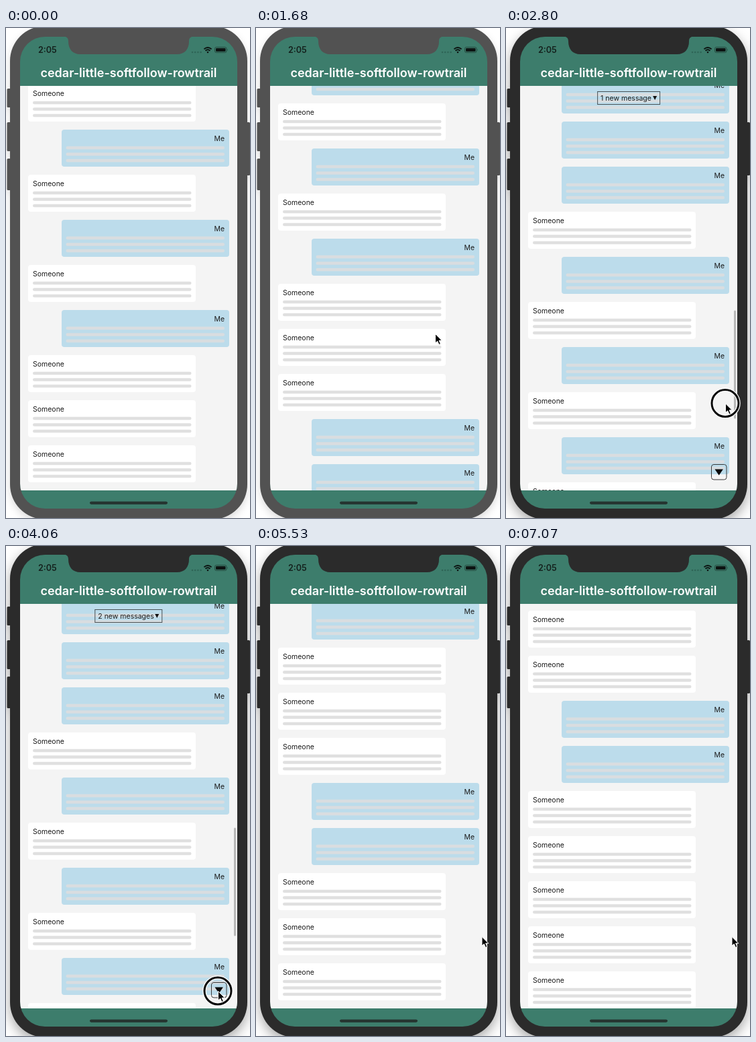
These frames come from a looping animation (364x728 px, 7.14 s). An HTML page:

```html
<!DOCTYPE html>
<html lang="en">
<head>
<meta charset="utf-8">
<title>Chat list demo</title>
<style>
  html, body { margin: 0; width: 100%; height: 100%; overflow: hidden; background: #fff; }
  #stage { position: relative; width: 364px; height: 728px; overflow: hidden; color: #525252; }
  #stage.active { color: #2b2b2b; }
  svg { position: absolute; inset: 0; display: block; }
  text, #badge { font-family: Inter, Roboto, sans-serif; }
  #body { fill: currentColor; filter: drop-shadow(0 5px 6px rgba(0, 0, 0, .14)); }
  .active #body { filter: drop-shadow(0 7px 9px rgba(0, 0, 0, .34)); }
  #list text { font-size: 10.5px; fill: #1c1c1c; }
  #badge {
    position: absolute; left: 183px; top: 94px; height: 18px; padding: 0 4px;
    transform: translateX(-50%); display: flex; align-items: center; gap: 2px;
    border: 1px solid #4a5256; font-size: 10.5px; color: #1c1c1c; white-space: nowrap;
  }
  #badge i { border: 3.5px solid transparent; border-top: 6px solid #111; border-bottom: 0; }
</style>
</head>
<body>
<div id="stage">
  <svg width="364" height="728" viewBox="0 0 364 728">
    <defs>
      <clipPath id="screen"><rect x="21" y="13" width="324" height="701" rx="37"/></clipPath>
      <clipPath id="view"><rect x="21" y="86" width="324" height="601"/></clipPath>
    </defs>
    <g id="body">
      <rect x="1.5" y="90" width="6" height="28" rx="1.5"/>
      <rect x="1.5" y="140" width="6" height="43" rx="1.5"/>
      <rect x="1.5" y="194" width="6" height="47" rx="1.5"/>
      <rect x="358" y="140" width="6" height="79" rx="1.5"/>
      <rect x="6" y="-3" width="354" height="733" rx="52"/>
    </g>
    <g clip-path="url(#screen)">
      <rect x="21" y="13" width="324" height="701" fill="#3d7d6c"/>
      <rect x="21" y="86" width="324" height="601" fill="#f4f4f4"/>
      <g clip-path="url(#view)"><g id="list"></g></g>
      <rect id="thumb" x="340" width="3" rx="1.5" fill="#b8b8b8"/>
      <rect x="125" y="703.5" width="116" height="4.2" rx="2.1" fill="#25332f"/>
    </g>
    <path fill="currentColor" d="M85 12C91 13 93 15 93 20C93 31 99 39 111 39H255C267 39 273 31 273 20C273 15 275 13 281 12Z"/>
    <text x="48" y="37" font-size="12.5" font-weight="600" fill="#14211d">2:05</text>
    <g fill="#2f6557">
      <circle cx="278" cy="36" r="1.3"/><circle cx="282.2" cy="36" r="1.3"/>
      <circle cx="286.4" cy="36" r="1.3"/><circle cx="290.6" cy="36" r="1.3"/>
    </g>
    <g fill="none" stroke="#0d1412" stroke-width="1.9">
      <path d="M295.4 31.4Q301 26.4 306.6 31.4"/>
      <path d="M297.5 33.7Q301 30.6 304.5 33.7"/>
      <path d="M301 37.2L299.9 35.7Q301 34.9 302.1 35.7Z" stroke-width="1"/>
    </g>
    <rect x="311.5" y="28.5" width="17.5" height="8" rx="2.3" fill="none" stroke="#24493f"/>
    <rect x="313" y="30" width="14.5" height="5" rx="1" fill="#0d1412"/>
    <path d="M330.3 31q1.4 1.5 0 3z" fill="#24493f"/>
    <text x="183" y="73.3" font-size="18" font-weight="600" text-anchor="middle" fill="#fff">cedar-little-softfollow-rowtrail</text>
    <g id="button">
      <rect x="306.5" y="648.5" width="22.5" height="22.5" rx="3.5" fill="none" stroke="#3a3a3a"/>
      <path d="M311.5 655.5h12.4l-6.2 9z" fill="#0a0a0a"/>
    </g>
    <g id="pointer">
      <g id="ring" fill="none">
        <circle r="20" stroke="#fff" stroke-width="5.5"/>
        <circle r="20" stroke="#0a0a0a" stroke-width="3"/>
      </g>
      <path d="M.5 .5V14L3.7 11.2L6 16.4L8.4 15.4L6.1 10.3H10.3Z" fill="#000" stroke="#fff" stroke-width="1"/>
    </g>
  </svg>
  <div id="badge"><span></span><i></i></div>
</div>
<script>
const LOOP = 7140, PITCH = 67, FIRST = -3;
const SENDERS = "MMMSMSMSMSSSMMSSSSS";
const $ = id => document.getElementById(id);
const stage = $("stage"), label = document.querySelector("#badge span");

$("list").innerHTML = [...SENDERS].map((who, i) => {
  const me = who === "M", x = me ? 83 : 33, y = 84 + (i + FIRST) * PITCH;
  const lineX = me ? 89.5 : 40;
  const lines = [24.7, 34.2, 43.8].map(dy =>
    `<rect x="${lineX}" y="${y + dy}" width="236.5" height="4.5" rx="2.2" fill="${me ? "#d9dde0" : "#e0e0e0"}"/>`).join("");
  const name = me
    ? `<text x="326" y="${y + 17}" text-anchor="end">Me</text>`
    : `<text x="40" y="${y + 17}">Someone</text>`;
  return `<rect x="${x}" y="${y}" width="250" height="55" rx="4" fill="${me ? "#bcdceb" : "#fff"}"/>${name}${lines}`;
}).join("");

const progress = (t, start, span) => Math.min(1, Math.max(0, (t - start) / span));
const smooth = p => p * p * (3 - 2 * p);

// Automatic scrolls: start time and distance
const AUTO = [[479, 67], [1459, 67], [4110, 461], [4675, 67], [5662, 67], [6779, 67]];
const drag = t => 327 * (1 - (1 - progress(t, 2200, 650)) ** 1.755);
const scrollAt = t =>
  AUTO.reduce((sum, [start, d]) => sum + d * smooth(progress(t, start, 400)), -drag(t));

// Pointer stops: time, x, y
const PATH = [[1540, 235, 505], [1680, 267, 454], [2130, 327, 234], [2200, 327, 234],
  [2850, 327, 561], [3080, 327, 561], [3750, 316, 661], [4150, 316, 661], [4600, 336.5, 580]];

function pointerAt(t) {
  const k = PATH.findIndex(p => p[0] > t);
  if (k < 0) return PATH[PATH.length - 1].slice(1);
  const [t0, x0, y0] = PATH[Math.max(0, k - 1)], [t1, x1, y1] = PATH[k];
  const p = smooth(progress(t, t0, t1 - t0));
  const y = t > 2200 && t < 2850 ? 234 + drag(t) : y0 + (y1 - y0) * p;
  return [x0 + (x1 - x0) * p, y];
}

const show = (el, on) => { el.style.visibility = on ? "visible" : "hidden"; };
const within = (t, a, b) => t >= a && t < b;

function draw(t) {
  const scroll = scrollAt(t);
  stage.classList.toggle("active", t >= 2150);
  $("list").setAttribute("transform", `translate(0 ${-Math.round(scroll)})`);

  const last = t < 2480 ? 10 : t < 4110 ? 11 : 12;
  const content = (last + 21) * PITCH;
  const below = (last - 8) * PITCH - scroll;
  const height = 345000 / content;
  $("thumb").setAttribute("height", height);
  $("thumb").setAttribute("y", 685 - below * 574 / content - height);
  $("thumb").style.opacity = 1 - progress(t, 4450, 100);
  show($("thumb"), within(t, 2220, 4550));

  show($("button"), within(t, 2240, 4440));
  show($("badge"), within(t, 2480, 4440));
  label.textContent = t < 3430 ? "1 new message" : "2 new messages";

  $("pointer").setAttribute("transform", `translate(${pointerAt(t)})`);
  show($("pointer"), t >= 1540);
  $("ring").style.display = within(t, 2150, 2860) || within(t, 3900, 4130) ? "" : "none";
}

const origin = performance.now();
function tick() {
  draw((performance.now() - origin) % LOOP);
  requestAnimationFrame(tick);
}
tick();
</script>
</body>
</html>
```
